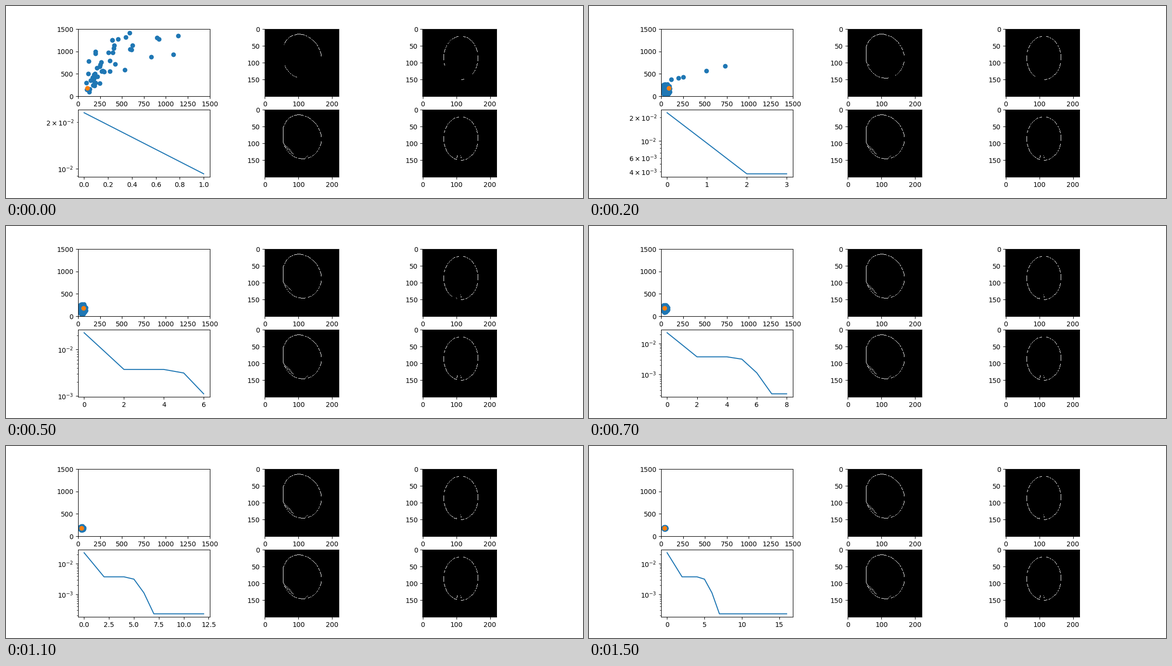
A matplotlib script that plays this animation: 1200 px wide and 400 px high, repeating every 1600 ms.

```python
import matplotlib.pyplot as plt
import numpy as np
from matplotlib.animation import FuncAnimation

FRAMES, INTERVAL, POPULATION = 16, 100, 50
LOSS = [0.023, 0.0093] + [0.00374] * 3 + [0.00314, 0.00112] + [0.00023] * 10
# Best parameters, and the frames at which a better solution takes over.
BEST = [(103, 185), (85, 180), (77, 178), (58, 179), (41, 180)]
IMPROVED = [1, 4, 5, 6]

rng = np.random.default_rng(7)
index = np.arange(POPULATION)
disc = np.sqrt((index + 0.5) / POPULATION)[:, None] * np.column_stack(
    [np.cos(2.4 * index), np.sin(2.4 * index)])
height = 60 + 1180 * rng.permutation(index / (POPULATION - 1)) ** 1.3
ratio = rng.lognormal(np.log(0.4), 0.6, POPULATION)
fan = np.column_stack([np.minimum(30 + height * ratio, 1120), height])
life = 1 + 3 * rng.random(POPULATION) ** 6


def cloud(frame):
    """Outliers fall in from a wide fan while the core shrinks to the best."""
    shrink = np.exp(-0.16 * max(frame - 4, 0))
    centre = np.array([42, 180]) + np.array([12, -40]) * shrink ** 4
    core = disc * [48 * shrink ** 0.6, 140 * shrink]
    reach = np.sqrt(np.maximum(0, 1 - frame / life))
    return centre + core + fan * reach[:, None]


def arc_points(start, stop):
    return np.radians(np.linspace(start, stop, abs(stop - start) // 4 + 2))


def tilted(start, stop):
    """Arc of the tilted oval with a flattened left side."""
    t = arc_points(start, stop)
    x = np.maximum(55, 110 + 58 * np.cos(t))
    y = 80.5 + 65.5 * np.sin(t + 0.1 - 0.06 * np.sin(t))
    return np.column_stack([x, y])


def upright(start, stop):
    t = arc_points(start, stop)
    return np.column_stack([114 + 51 * np.cos(t), 85.5 + 64.5 * np.sin(t)])


def edges(*paths):
    """Rasterise polylines to a one-pixel edge map."""
    image = np.zeros((200, 220))
    for path in paths:
        path = np.rint(path).astype(int)
        for a, b in zip(path, path[1:]):
            steps = np.abs(b - a).max() + 1
            x, y = np.rint(np.linspace(a, b, steps)).astype(int).T
            image[y, x] = 1
    return image


hook = [(58, 104), (63, 107)]
tick = [(121, 143), (127, 137)]
streaks = [[(58, 104), (66, 110), (80, 124)], [(57, 108), (62, 111), (85, 132)]]
open_a = tilted(79, 418)
goal_a = edges(tilted(79, 435), tick, *streaks)

notch = [(113, 136), (115, 140), (114, 150), (116, 150)]
slit = [(103, 136), (103, 141), (101, 145), (102, 148)]
stub = [(100, 144), (102, 148)]
open_b, closing_b = upright(121, 448), upright(103, 121)
goal_b = edges(open_b, closing_b, notch, slit)

FITS_A = [edges(tilted(-155, 0), tilted(105, 155)), edges(open_a, hook),
          edges(open_a, hook), edges(tilted(79, 435), streaks[0]), goal_a]
FITS_B = [edges(upright(160, 407), upright(76, 88)), edges(open_b),
          edges(open_b, notch), edges(open_b, notch, stub),
          edges(open_b, closing_b, notch, stub)]

fig, axes = plt.subplots(2, 3, figsize=(12, 4), dpi=100)
(ax_points, ax_fit_a, ax_fit_b), (ax_loss, ax_goal_a, ax_goal_b) = axes


def show(ax, image):
    return ax.imshow(image, cmap="gray", vmin=0, vmax=1, interpolation="nearest")


ax_points.set(xlim=(0, 1500), ylim=(0, 1500))
candidates = ax_points.scatter(*cloud(0).T)
best = ax_points.scatter(*BEST[0])
loss_line, = ax_loss.plot(LOSS[:2])
ax_loss.set_yscale("log")
fit_a = show(ax_fit_a, FITS_A[0])
fit_b = show(ax_fit_b, FITS_B[0])
show(ax_goal_a, goal_a)
show(ax_goal_b, goal_b)


def update(frame):
    level = sum(frame >= start for start in IMPROVED)
    candidates.set_offsets(cloud(frame))
    best.set_offsets([BEST[level]])
    fit_a.set_data(FITS_A[level])
    fit_b.set_data(FITS_B[level])
    loss_line.set_data(range(frame + 2), LOSS[:frame + 2])
    ax_loss.relim()
    ax_loss.autoscale_view()
    return candidates, best, fit_a, fit_b, loss_line


animation = FuncAnimation(fig, update, frames=FRAMES, interval=INTERVAL,
                          repeat=True, repeat_delay=0, blit=False)
plt.show()
```
